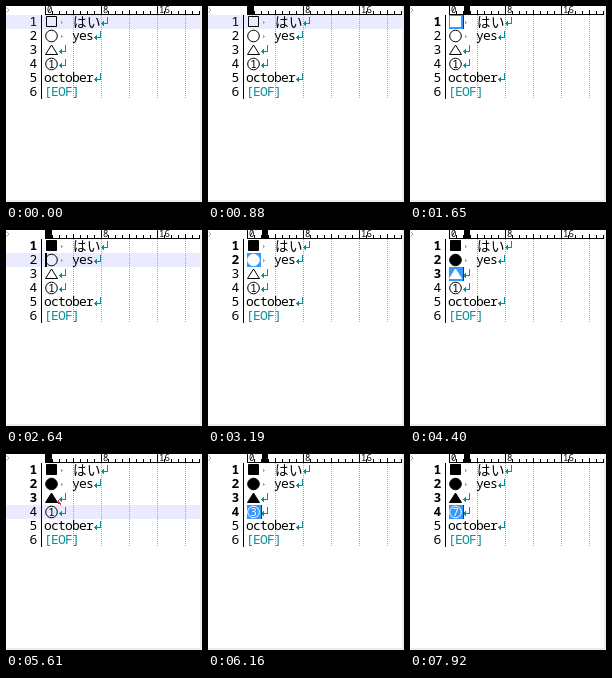
Animation of 196 by 196 pixels, one loop 8 s. Source, as an HTML page with a canvas:

```html
<!DOCTYPE html>
<html lang="ja">
<head>
<meta charset="utf-8">
<title>Editor</title>
<style>
html, body { margin: 0; width: 100%; height: 100%; overflow: hidden; background: #fff; }
canvas { display: block; width: 196px; height: 196px; }
</style>
</head>
<body>
<canvas id="stage"></canvas>
<script>
const SIZE = 196, LOOP = 8000;
const LEFT = 39, TOP = 9, COL = 7, ROW = 14;
const INK = '#000', TEAL = '#0a9098', BLUE = '#3399ff', NAVY = '#08386c', GREY = '#a8a8a8';
const MONO = '"Noto Sans Mono", "Liberation Mono", monospace';
const KANA = '"Noto Sans CJK JP", "Noto Sans CJK", sans-serif';

const canvas = document.getElementById('stage');
const ctx = canvas.getContext('2d');
const dpr = window.devicePixelRatio || 1;
canvas.width = canvas.height = Math.round(SIZE * dpr);
ctx.scale(dpr, dpr);

// Each step changes part of the editor state.
const start = { row: 0, col: 0, ruler: false, caret: false, sel: false, edited: 0, digit: 1, mark: false };
const on = { caret: true }, off = { caret: false };
const select = edited => ({ col: 2, sel: true, edited });
const down = row => ({ row, col: 2, sel: false, caret: true });
const home = { col: 0, caret: true };
const steps = [
  [330, { ruler: true, caret: true }],
  [880, off],
  [1430, on],
  [1650, select(1)],
  [2200, down(1)],
  [2640, home],
  [3080, off],
  [3190, select(2)],
  [3630, down(2)],
  [3960, home],
  [4400, select(3)],
  [4840, down(3)],
  [5170, { col: 0, caret: false }],
  [5280, on],
  [5610, { caret: false, mark: true }],
  [5720, { ...select(4), digit: 2, mark: false }],
  [6050, on],
  [6160, { digit: 3 }],
  [6490, off],
  [6600, { digit: 4 }],
  [7040, on],
  [7150, { digit: 5 }],
  [7370, off],
  [7480, { digit: 6 }],
  [7810, on],
  [7920, { digit: 7 }]
];

function stateAt(t) {
  const s = { ...start };
  for (const [time, patch] of steps) if (t >= time) Object.assign(s, patch);
  return s;
}

const xOf = col => LEFT + col * COL;
const yOf = row => TOP + row * ROW;

function rect(x, y, w, h, color) {
  ctx.fillStyle = color;
  ctx.fillRect(x, y, w, h);
}

function text(str, x, y, font, color = INK, align = 'left') {
  ctx.font = font;
  ctx.fillStyle = color;
  ctx.textAlign = align;
  ctx.fillText(str, x, y);
}

// Half-width letters, one per cell.
function cells(str, row, col, color) {
  [...str].forEach((ch, i) =>
    text(ch, xOf(col + i) + 3, yOf(row) + 11, '13px ' + MONO, color, 'center'));
}

function returnMark(row, col) {
  const x = xOf(col), y = yOf(row);
  rect(x + 6, y + 2, 1, 7, TEAL);
  rect(x, y + 8, 7, 1, TEAL);
  rect(x + 1, y + 7, 1, 3, TEAL);
  rect(x + 2, y + 6, 1, 5, TEAL);
}

function tabMark(row) {
  const x = xOf(2), y = yOf(row);
  rect(x + 2, y + 6, 1, 3, GREY);
  rect(x + 3, y + 7, 1, 1, GREY);
}

// Dotted column guides every four cells.
function guides() {
  for (let x = xOf(4); x < 194; x += 4 * COL)
    for (let y = TOP; y < yOf(6); y += 2) rect(x, y, 1, 1, GREY);
}

function symbol(row, s) {
  const x = LEFT, y = yOf(row), cx = x + 6.5, cy = y + 7;
  const selected = s.sel && s.row === row;
  const color = selected ? '#fff' : INK;
  if (selected) rect(x, y, 2 * COL, ROW, BLUE);
  ctx.beginPath();
  if (row === 0) {
    ctx.rect(x + 1.5, y + 1.5, 10, 10);
  } else if (row === 2) {
    ctx.moveTo(cx, y + 2);
    ctx.lineTo(x + 12.5, y + 11.5);
    ctx.lineTo(x + 0.5, y + 11.5);
    ctx.closePath();
  } else {
    ctx.arc(cx, cy, 5.8, 0, Math.PI * 2);
  }
  ctx.lineWidth = 1;
  ctx.strokeStyle = ctx.fillStyle = color;
  if (row < 3 && row < s.edited) ctx.fill();
  ctx.stroke();
  if (row === 3) text(s.digit, cx, cy + 4, '11px ' + MONO, color, 'center');
}

function ruler(s) {
  rect(LEFT, 8, 194 - LEFT, 1, INK);
  for (let c = 0; xOf(c) < 194; c++) {
    const h = c % 8 ? (c % 4 ? 3 : 4) : 8;
    rect(xOf(c), 8 - h, 1, h, INK);
    if (c % 8 === 0) text(c, xOf(c) + 2, 7, '9px ' + MONO);
  }
  if (s.ruler) rect(xOf(s.col) + 1, 0, 6, 9, INK);
  ctx.strokeStyle = GREY;
  ctx.lineWidth = 1;
  ctx.beginPath();
  ctx.moveTo(0.5, 1.5);
  ctx.lineTo(3, 4);
  ctx.lineTo(0.5, 6.5);
  ctx.stroke();
}

function draw(t) {
  const s = stateAt(t);
  rect(0, 0, SIZE, SIZE, '#fff');
  if (!s.sel) rect(0, yOf(s.row), 194, ROW, '#ebebff');
  ruler(s);
  guides();

  for (let r = 0; r < 6; r++) {
    const weight = r < s.edited ? 'bold ' : '';
    text(r + 1, 27.5, yOf(r) + 11, weight + '13px ' + MONO, INK, 'center');
  }
  rect(35, TOP, 1, 6 * ROW, INK);

  for (let r = 0; r < 4; r++) symbol(r, s);
  tabMark(0);
  tabMark(1);
  text('は', xOf(4), yOf(0) + 12, '300 13.5px ' + KANA);
  text('い', xOf(6), yOf(0) + 12, '300 13.5px ' + KANA);
  cells('yes', 1, 4, INK);
  cells('october', 4, 0, INK);
  cells('[EOF]', 5, 0, TEAL);
  [8, 7, 2, 2, 7].forEach((col, row) => returnMark(row, col));

  if (s.caret) rect(xOf(s.col), yOf(s.row), s.sel ? 1 : 2, ROW, s.sel ? NAVY : INK);
  if (s.mark) {
    rect(52, 46, 1, 4, '#f02020');
    rect(53, 48, 1, 2, '#f02020');
    rect(54, 49, 1, 2, '#f02020');
  }
  rect(0, 194, SIZE, 2, '#ececec');
  rect(194, 0, 2, SIZE, '#ececec');
}

const origin = performance.now();
function tick() {
  draw((performance.now() - origin) % LOOP);
  requestAnimationFrame(tick);
}
tick();
</script>
</body>
</html>
```
